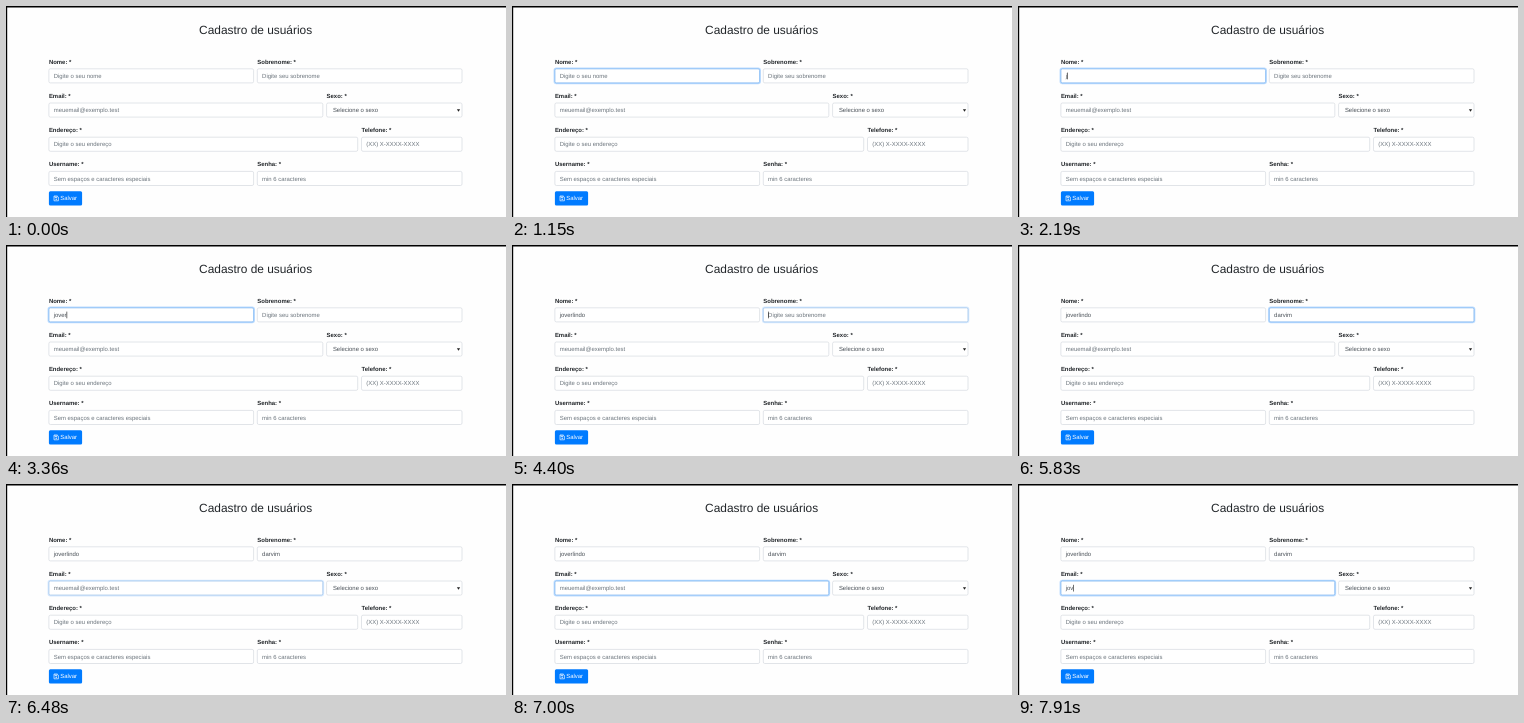
Animation, 500 px wide and 211 px high, one loop 8 s. Source, as an HTML page:

```html
<!DOCTYPE html>
<html lang="pt-br">
<head>
<meta charset="utf-8">
<title>Cadastro de usuários</title>
<style>
  html, body { margin: 0; width: 100%; height: 100%; overflow: hidden; background: #fefefe; }
  svg { display: block; width: 100vw; height: 100vh; }
  text { font: 5.95px "Liberation Sans", Arial, sans-serif; fill: #495057; text-rendering: geometricPrecision; }
  .title { font-size: 11.9px; fill: #212529; text-anchor: middle; }
  .label { font-weight: bold; fill: #212529; }
  .hint { fill: #6c757d; }
  .box { fill: #fff; stroke: #ced4da; stroke-width: .6; }
  .ring { fill: none; stroke: #007bff; stroke-opacity: .25; stroke-width: 1.3; }
  .edge { fill: none; stroke: #80bdff; stroke-width: .7; }
  .caret { fill: #111; }
  .button text { fill: #fff; }
</style>
</head>
<body>
<svg id="stage" viewBox="0 0 500 211" preserveAspectRatio="none">
  <rect width="500" height="211" fill="#fefefe"/>
  <path d="M0 0H500V1.4H1.2V211H0Z" fill="#000"/>
  <text class="title" x="249.6" y="28">Cadastro de usuários</text>
  <g id="form"></g>
  <path d="M450.9 103.2h3.2l-1.6 2.6z" fill="#222"/>
  <g class="button">
    <rect x="42.9" y="185.2" width="33.2" height="14.2" rx="1.5" fill="#007bff"/>
    <path d="M48 190h3.2l1.2 1.2v3.6h-4.4zM49 190v1.5h2v-1.5" fill="none" stroke="#fff" stroke-width=".65"/>
    <circle cx="50.2" cy="193.2" r=".7" fill="#fff"/>
    <text x="54.2" y="194.3">Salvar</text>
  </g>
</svg>
<script>
const LOOP = 8000;
const LEFT = 42.9, HEIGHT = 14.1, PAD = 4.8;
const FIRST = "joverlindo", LAST = "darvim";
const form = document.getElementById("form");

function add(parent, tag, attrs, content = "") {
  const node = document.createElementNS("http://www.w3.org/2000/svg", tag);
  for (const key in attrs) node.setAttribute(key, attrs[key]);
  node.textContent = content;
  parent.append(node);
  return node;
}

function field(row, x, right, label, hint, isSelect) {
  const top = 62.8 + row * 34.2;
  const rect = { x, y: top, width: right - x, height: HEIGHT, rx: 1.5 };
  add(form, "text", { class: "label", x, y: top - 5.3 }, label + ": *");
  add(form, "rect", { ...rect, class: "box" });
  const glow = add(form, "g", { opacity: 0 });
  add(glow, "rect", {
    class: "ring", x: x - .7, y: top - .7,
    width: right - x + 1.4, height: HEIGHT + 1.4, rx: 2.1
  });
  add(glow, "rect", { ...rect, class: "edge" });
  const textX = x + PAD + (isSelect ? 1.5 : 0);
  const text = add(form, "text", {
    class: isSelect ? "" : "hint", x: textX, y: top + 9.1
  }, hint);
  const caret = add(form, "rect", {
    class: "caret", x: textX, y: top + 3.8, width: .6, height: 6.7, opacity: 0
  });
  return { hint, glow, text, caret, textX };
}

const fields = {
  first: field(0, LEFT, 247.6, "Nome", "Digite o seu nome"),
  last: field(0, 251.3, 456, "Sobrenome", "Digite seu sobrenome"),
  email: field(1, LEFT, 316.8, "Email", "meuemail@exemplo.test")
};
field(1, 320.6, 456, "Sexo", "Selecione o sexo", true);
field(2, LEFT, 351.7, "Endereço", "Digite o seu endereço");
field(2, 355.5, 456, "Telefone", "(XX) X-XXXX-XXXX");
field(3, LEFT, 247.6, "Username", "Sem espaços e caracteres especiais");
field(3, 251.3, 456, "Senha", "min 6 caracteres");

const words = { first: FIRST, last: LAST, email: FIRST };

// Per field: focus span, [time, letters typed], [time, caret shown]
const script = {
  first: {
    focus: [500, 4400],
    typed: [[2060, 1], [2970, 2], [3100, 3], [3360, 5], [3490, 6], [3620, 7], [3750, 9], [4010, 10]],
    caret: [[630, 1], [1150, 0], [1800, 1], [2710, 0], [2970, 1]]
  },
  last: {
    focus: [4400, 6480],
    typed: [1, 2, 3, 4, 5, 6].map(n => [4920 + n * 130, n]),
    caret: [[4400, 1], [5830, 0]]
  },
  email: {
    focus: [6480, LOOP],
    typed: [[7260, 1], [7780, 2], [7910, 3]],
    caret: [[6610, 1], [7000, 0], [7260, 1]]
  }
};

const valueAt = (steps, t) => steps.reduce((v, [at, next]) => t >= at ? next : v, 0);

function draw(t) {
  for (const name in script) {
    const { focus: [start, end], typed, caret } = script[name];
    const f = fields[name];
    const focused = t >= start && t < end;
    const value = words[name].slice(0, valueAt(typed, t));
    const shown = value || f.hint;
    if (f.text.textContent !== shown) {
      f.text.textContent = shown;
      f.text.setAttribute("class", value ? "" : "hint");
    }
    f.glow.setAttribute("opacity", focused ? (t < start + 130 ? .6 : 1) : 0);
    f.caret.setAttribute("opacity", focused ? valueAt(caret, t) : 0);
    f.caret.setAttribute("x", f.textX + (value ? f.text.getComputedTextLength() : 0));
  }
}

const begin = performance.now();
function tick() {
  draw((performance.now() - begin) % LOOP);
  requestAnimationFrame(tick);
}
tick();
</script>
</body>
</html>
```
